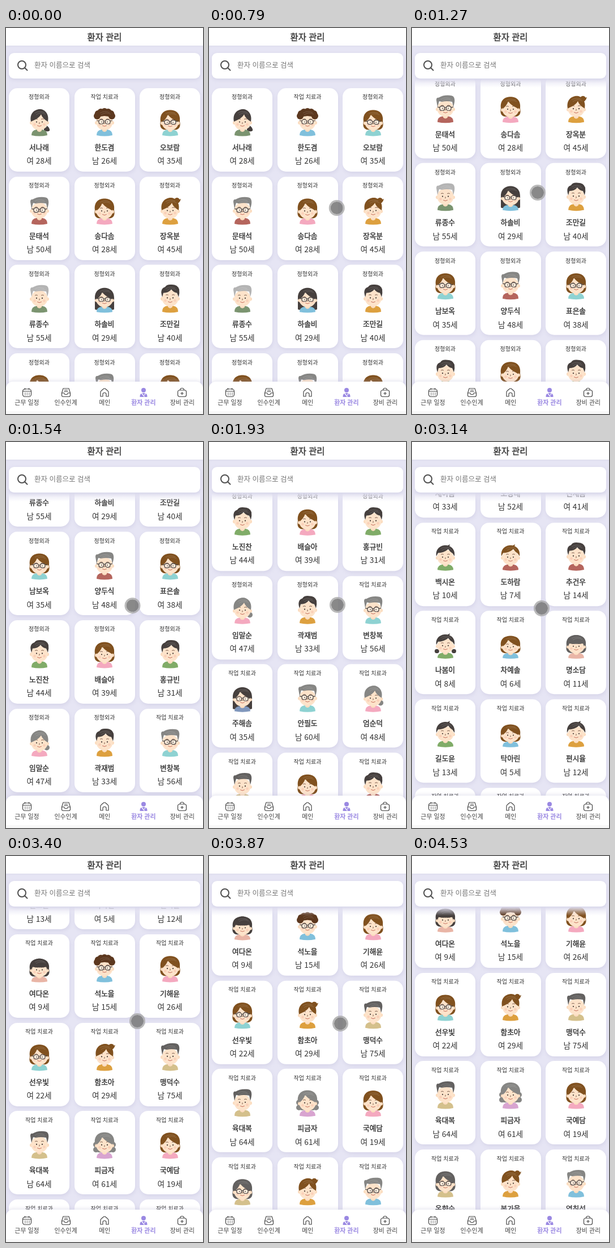
Recreate the animation shown at these times as an HTML page. Size 348 px wide and 680 px high, loop 5.06 s.

```html
<!DOCTYPE html>
<html lang="ko">
<head>
<meta charset="utf-8">
<title>환자 관리</title>
<style>
html, body { margin: 0; width: 100%; height: 100%; overflow: hidden; }
body { position: relative; background: #e6e5f4; color: #333; font-family: "Noto Sans CJK KR", "Noto Sans CJK", sans-serif; }
div, svg { position: absolute; box-sizing: border-box; }
.text { left: 0; width: 100%; height: 20px; line-height: 20px; text-align: center; white-space: pre; }
#title { top: 0; left: 0; width: 348px; height: 31px; background: #fff; box-shadow: 0 1px 3px #c9c7dc66; }
#title .text { top: 5px; font-size: 15.4px; -webkit-text-stroke: .35px; }
#top { top: 31px; left: 0; width: 348px; height: 59px; background: #e6e5f4; }
#top::after { content: ""; position: absolute; top: 59px; width: 348px; height: 15px; background: linear-gradient(#e6e5f4f5, #e6e5f400); }
#search { left: 5px; top: 13px; width: 338px; height: 45px; border-radius: 9px; background: #fff; box-shadow: 0 2px 6px #b9b6d466; z-index: 1; }
#search .text { left: 45px; top: 11.3px; text-align: left; font-size: 12.5px; color: #777; }
#view { top: 90px; left: 0; width: 348px; height: 541px; overflow: hidden; }
.card { width: 107px; height: 147px; border-radius: 15px; background: #fff; box-shadow: 1px 3px 6px #b9b6d455; }
.dept { top: 5.5px; font-size: 10px; }
.name { top: 94px; font-size: 12.7px; -webkit-text-stroke: .4px; }
.age { top: 117.6px; font-size: 13.7px; font-weight: 300; }
.card svg { left: 29.5px; top: 36px; overflow: visible; }
#nav { top: 623px; left: 0; width: 348px; height: 52px; border-radius: 12px 12px 0 0; background: #fff; box-shadow: 0 -2px 6px #b9b6d455; }
#foot { top: 675px; width: 348px; height: 5px; background: #f8f8f8; }
.tab { top: 0; width: 70px; height: 52px; color: #444; }
.tab svg { left: 26px; top: 10px; }
.tab .text { top: 25.5px; font-size: 10.95px; }
.tab.on { color: #9a88e2; font-weight: 700; }
#dot { left: -14px; top: -14px; width: 28px; height: 28px; border-radius: 50%; background: #777777dd; border: 3px solid #a8a8a8cc; background-clip: padding-box; }
</style>
</head>
<body>
<div id="view"><div id="list"></div></div>
<div id="top">
  <div id="search">
    <svg width="45" height="45" fill="none" stroke="#505050" stroke-width="2" stroke-linecap="round"><circle cx="23" cy="21" r="7"/><path d="M28 26l4.5 4.5"/></svg>
    <div class="text">환자 이름으로 검색</div>
  </div>
</div>
<div id="title"><div class="text">환자 관리</div></div>
<div id="nav"></div>
<div id="foot"></div>
<div id="dot"></div>
<script>
// name, sex + age, hair style, hair colour, shirt colour (* = glasses)
const people = `
서나래 여28 pony K g,한도겸 남26 curly D b*,오보람 여35 bob B t*
문태석 남50 man G r*,송다솜 여28 bob B p,장옥분 여45 bun B o
류종수 남55 man L g,하솔비 여29 long K b*,조만길 남40 boy K o
남보옥 여35 bob B t*,양두식 남48 man G r*,표은솔 여38 bob B t*
노진찬 남44 boy K m,배슬아 여39 bob B p,홍규빈 남31 boy K m
임말순 여47 low G p,곽재범 남33 boy K o,변창복 남56 man G t*
주해솜 여35 long K i*,안필도 남60 man G t*,엄순덕 여48 low G p
성만호 남53 man S n,방초롱 여38 bob B p,우도빈 남44 boy K r
채아름 여33 pony K m,모상태 남52 man L w,진새봄 여41 long S i*
백시온 남10 kid K m,도하람 남7 kid B r,추건우 남14 boy K r
나봄이 여8 pigs K m,차예솔 여6 girl B b,명소담 여11 bangs S e
길도윤 남13 kid K m,탁아린 여5 girl B b,편시율 남12 kid K o
여다온 여9 bangs K e,석노을 남15 curly D b*,기해윤 여26 bob B p
선우빛 여22 bob B t*,함초아 여29 bun B o,맹덕수 남75 man S n
육대복 남64 man S n,피금자 여61 wave G v,국예담 여19 bob B p
옥향숙 여58 bob S n*,봉가을 여24 bun B o,염칠성 남66 man G b*`.trim().split(/[\n,]/);

const hairs = { K: '#46403e', B: '#80511f', D: '#5c381f', G: '#868684', L: '#b4b4b4', S: '#636160' };
const shirts = { g: '#7b9470', b: '#80c0dc', t: '#8ed2d2', r: '#b5655d', p: '#f4a9bf', o: '#dda03f', n: '#d4c08c',
  v: '#d8a4d0', i: '#8097bc', w: '#7d5a40', m: '#80ac68', e: '#e9b5a6' };

const path = d => `<path d="${d}"/>`;
const ball = (x, y, r) => `<circle cx="${x}" cy="${y}" r="${r}"/>`;
const both = (x, y, r) => ball(-x, y, r) + ball(x, y, r);
const sweep = path('M-15 23C-18 7-7 1 1 1S18 9 15 23C10 20 5 16 3 10C0 16-8 20-15 23Z');
const parted = path('M-14 23C-16 9-8 2 0 2S16 9 14 23C8 19 0 16-4 9C-6 15-10 20-14 23Z');
const round = path('M-17 22C-19 6-9 1 0 1S19 6 17 22C19 31 16 36 10 37H-10C-16 36-19 31-17 22Z');
const mop = path('M-16 22C-18 8-8 2 0 2S18 8 16 22L13 17Q8 14 5 9Q-3 16-13 16ZM3 3l5-3-1 4Z');
const curls = [0, 1, 2, 3, 4, 5, 6].map(i => ball(-13 * Math.cos(i * Math.PI / 6), 13 - 8 * Math.sin(i * Math.PI / 6), 6)).join('');

// style: [behind the face, in front of it, height]
const styles = {
  pony: [path('M8 34Q13 34 13 30Q19 34 18 39Q13 42 8 38Z'), sweep, 1],
  curly: ['', curls + path('M-12 16V8H12V16Q0 10-12 16Z'), 1],
  bob: [round, parted, .97],
  girl: [round, parted, .85],
  man: ['', path('M-14 21L-16 9Q-16 4-12 5Q-4 0 8 1Q15 1 16 7Q17 12 14 21L12 12Q2 10-6 12L-11 11Z'), 1.02],
  boy: ['', path('M-14 22Q-19 8-9 5Q-6 0 3 1Q13 1 16 9Q17 15 15 22L12 15Q6 14 2 9Q-3 15-12 15Z'), 1.04],
  bun: [ball(12, 6, 5) + path('M12 6l7-3-2 5Z'), sweep, 1],
  long: [path('M-17 42V20C-17 6-8 1 0 1S17 6 17 20V42Q14 44 11 42H-11Q-14 44-17 42Z'), parted, .92],
  low: [ball(13, 32, 5), sweep, .98],
  kid: ['', mop, .96],
  pigs: [both(15, 34, 4), mop, .92],
  bangs: [round, path('M-14 24C-16 9-8 1 0 1S16 9 14 24L12 18Q0 20-12 18Z'), .88],
  wave: [round + both(15, 23, 5) + both(15, 32, 5), parted, .98]
};

function avatar(style, hair, shirt, glasses) {
  const [back, front, tall] = styles[style];
  const specs = `<g fill="#ffffff55" stroke="#494545" stroke-width="1.2"><rect x="-10" y="19.5" width="8.5" height="7.5" rx="3"/><rect x="1.5" y="19.5" width="8.500" height="7.5" rx="3"/><path d="M-1.5 22h3M-10 22l-4-1M10 22l4-1"/></g>`;
  return `<svg width="48" height="50" viewBox="-24 0 48 50"><g transform="translate(0 ${49 - 49 * tall}) scale(1 ${tall})">
    <g fill="${hair}">${back}</g>
    <path fill="${shirt}" d="M-14 47Q-14 38-5 37H5Q14 38 14 47Q0 50-14 47Z"/>
    <g fill="#fbdcbf">${path('M-4 35h8v4q-4 4-8 0z') + both(14, 25, 3)}</g>
    <ellipse cy="24" rx="14.5" ry="14" fill="#fde3ca"/>
    <g fill="#f8c3ab99">${both(8.5, 28, 2.3)}</g>
    <g fill="#3d3330">${both(5, 23.5, 1.1)}</g>
    <g fill="none" stroke="#6b4a3a" stroke-width=".9" stroke-linecap="round">
      <path d="M-7.5 18.500q2-1.3 4 0M3.5 18.500q2-1.3 4 0M0 24.500q1.300 2-.5 2.200"/><path stroke="#c0614f" d="M-3.5 30q3.5 2.600 7 0"/></g>
    <g fill="${hair}">${front}</g>
    <path d="M-8 8Q0 3 9 7M-6 11Q2 5 11 10" fill="none" stroke="#ffffff38" stroke-width=".7"/>
    ${glasses ? specs : ''}</g></svg>`;
}

const pitch = 155.75;
list.innerHTML = people.map((p, i) => {
  const [name, who, style, hair, shirt] = p.split(' ');
  const dept = i > 16 || i === 1 ? '작업 치료과' : '정형외과';
  return `<div class="card" style="left:${5 + i % 3 * 115.5}px;top:${15.8 + Math.floor(i / 3) * pitch}px">
    <div class="text dept">${dept}</div>${avatar(style, hairs[hair], shirts[shirt[0]], shirt[1])}
    <div class="text name">${name}</div><div class="text age">${who[0]} ${who.slice(1)}세</div></div>`;
}).join('');

const tabs = [
  ['근무 일정', '<rect x="1.5" y="3" width="15" height="13.5" rx="4"/><path d="M5.5 1.2v3M12.5 1.2v3M1.5 7h15"/><path stroke-dasharray="1.6 2" d="M5 10.3h9M5 13.3h9"/>'],
  ['인수인계', '<path d="M4 2h10l2.5 8v4q0 2.5-2.5 2.5H4Q1.5 16.5 1.5 14V10ZM1.5 10h4l1.5 2.5h4l1.5-2.5h4M6 5h6M5.5 7.5h7"/>'],
  ['메인', '<path d="M2 16V8.5Q2 7 4 5.5L7.5 2.5Q9 1.5 10.5 2.5L14 5.5Q16 7 16 8.5V16H12V12Q12 9.5 9 9.5T6 12V16Z"/>'],
  ['환자 관리', '<g fill="currentColor" stroke="none"><circle cx="9" cy="5" r="4"/><path d="M2.5 17Q2 10 9 10T15.5 17Z"/></g><path stroke="#fff" d="M5.5 10.5l5 6M12.5 10.5l-2 3.5"/>'],
  ['장비 관리', '<rect x="1.5" y="5" width="15" height="11.5" rx="3"/><path d="M5.5 5Q5.5 1.5 9 1.5T12.5 5M9 8v5.5M6.25 10.75h5.5"/>']
];
nav.innerHTML = tabs.map(([label, icon], i) =>
  `<div class="tab${i === 3 ? ' on' : ''}" style="left:${2 + i * 68.6}px"><svg width="18" height="18" fill="none" stroke="currentColor" stroke-width="1.2">${icon}</svg><div class="text">${label}</div></div>`).join('');

// Monotone cubic through [tick, value] points; flat outside them.
function curve(pts) {
  const slope = pts.slice(1).map(([t, v], i) => (v - pts[i][1]) / (t - pts[i][0]));
  const tan = pts.map((_, i) => {
    const a = slope[i - 1] || 0, b = slope[i] || 0;
    return a * b > 0 ? 2 * a * b / (a + b) : 0;
  });
  return t => {
    if (t <= pts[0][0]) return pts[0][1];
    const i = pts.findIndex(p => p[0] >= t) - 1;
    if (i < 0) return pts[pts.length - 1][1];
    const [t0, a] = pts[i], [t1, b] = pts[i + 1], h = t1 - t0, u = (t - t0) / h, w = 1 - u;
    return a * w * w * (1 + 2 * u) + b * u * u * (3 - 2 * u) + h * u * w * (w * tan[i] - u * tan[i + 1]);
  };
}

const scroll = curve([[13, 0], [19, 179.3], [23, 415], [25, 415], [29, 648.8], [31, 760], [34, 760], [39, 1037.2],
  [40, 1050], [42, 1050], [47, 1365.8], [51, 1837.1], [55, 1837.1], [59, 1924.9]]);
const dotX = curve([[3, 331], [12, 222], [19, 222], [29, 227], [39, 229], [47, 229], [51, 232], [60, 232], [68, 315]]);
const dotY = curve([[3, 700], [12, 301], [19, 290], [29, 287], [39, 292], [47, 293], [51, 291], [55, 291], [59, 296], [60, 296], [68, 700]]);

const loop = 5060, start = performance.now();
function draw() {
  const ms = (performance.now() - start) % loop;
  const tick = Math.floor((ms + 4) * 15 / 1000); // the picture steps 15 times a second
  list.style.transform = `translateY(${-scroll(tick)}px)`;
  dot.style.transform = `translate(${dotX(tick)}px, ${dotY(tick)}px)`;
  requestAnimationFrame(draw);
}
draw();
</script>
</body>
</html>
```
